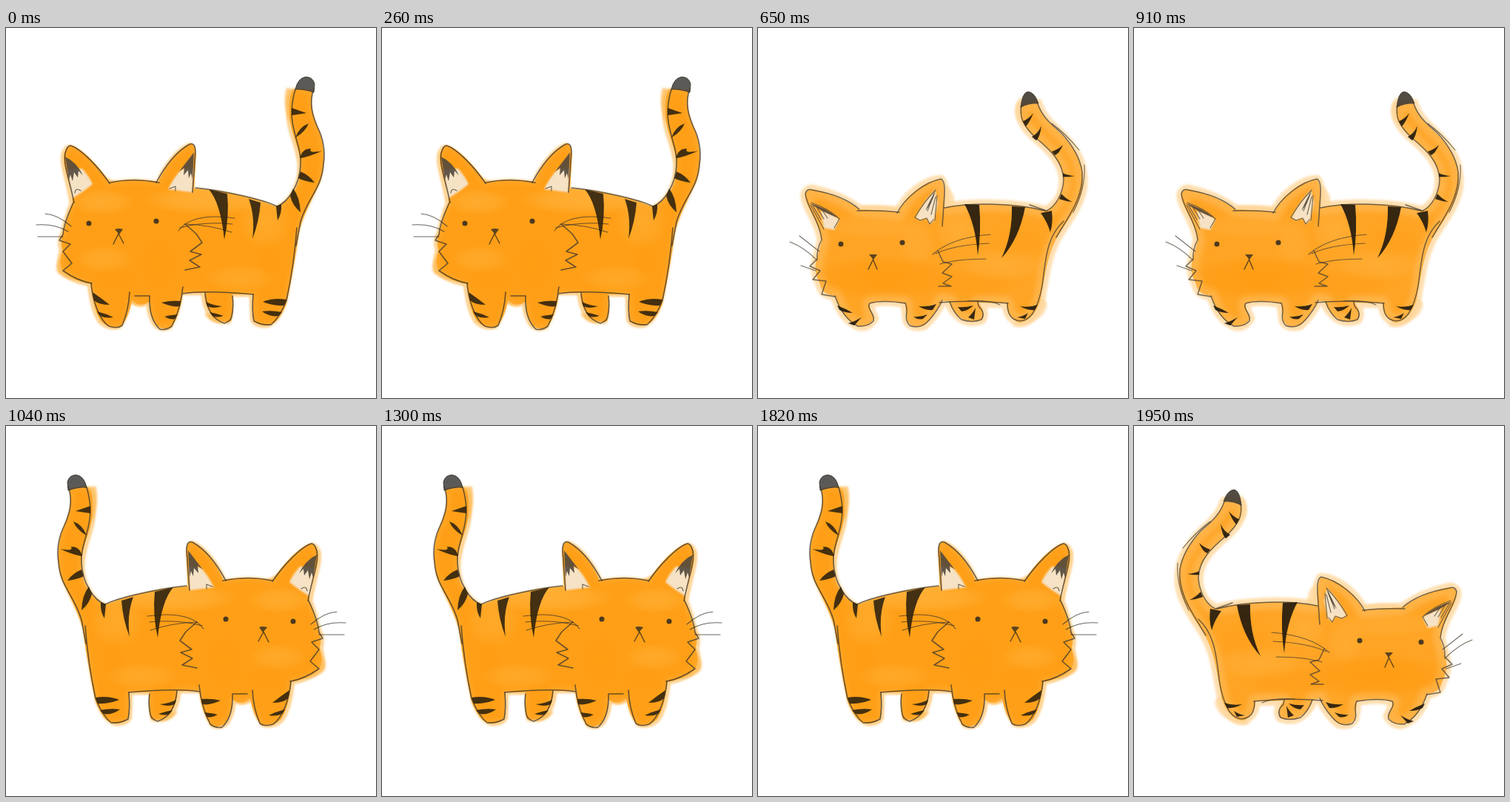
Recreate the animation shown at these times as an HTML page with a canvas. Size 500 px wide and 500 px high, loop 2080 ms.

```html
<!DOCTYPE html>
<html lang="en">
<head>
<meta charset="utf-8">
<title>Tiger cat</title>
<style>
html, body { margin: 0; width: 100%; height: 100%; overflow: hidden; background: #fff; }
canvas { display: block; width: 500px; height: 500px; }
</style>
</head>
<body>
<canvas id="stage" width="500" height="500"></canvas>
<script>
const ctx = document.getElementById('stage').getContext('2d');
const STEP = 130, STEPS = 16;

const standing = {
  paint: '#ff9f17', halo: '#ffb84f', haloWidth: 4, shift: [-2, 1],
  rim: '#ffab33', rimWidth: 8,
  ink: '#3a352c', lineWidth: 1.6, stripeInk: '#30230f',
  body: 'M90 236C86 205 75 185 79 168Q84 156 92 160C108 168 128 190 140 209Q172 202 206 208C214 190 230 164 250 156Q258 158 256 180L254 217C300 220 345 232 366 242C384 234 398 214 398 188C398 160 382 140 383 112C382 96 385 82 394 82L415 84C410 100 414 118 421 134C433 160 430 190 425 206C415 230 402 250 396 275C391 310 385 345 379 372Q368 400 354 402Q336 402 334 392L333 360L306 360Q308 385 304 396Q285 400 276 386Q268 372 268 358L239 358Q236 385 224 404Q212 410 202 400Q193 385 194 370Q182 378 170 368Q166 390 156 403Q140 408 128 396C118 380 116 360 114 346Q90 342 76 328Q71 315 76 300Q72 285 78 275Q84 250 90 236Z',
  spill: ['M381 80Q375 100 385 128L392 82Z', 'M78 306Q66 318 72 330Q84 340 98 340Z', 'M128 196L152 208L138 214Z',
    'M168 360Q170 376 186 374L194 366V358Z', 'M270 384Q276 398 296 398L285 388Z'],
  // x, y, rx, ry, lightness
  patches: [[275, 232, 70, 16, .16], [130, 235, 34, 14, .12], [350, 262, 28, 30, .1], [205, 318, 22, 30, -.12],
    [132, 312, 30, 14, .1], [318, 338, 40, 14, .09], [148, 340, 26, 14, -.1], [355, 320, 12, 36, -.1]],
  inner: ['M83 192L103 190Q112 200 117 211Q104 222 88 231Q87 212 83 192Z', 'M237 191L253 190L252 222Q234 220 219 218Q226 203 237 191Z'],
  tufts: ['M80 174Q95 181 104 199L98 193L97 202L92 195L90 207L87 198L85 205Z', 'M254 168Q244 181 234 194L241 189L240 199L246 192L247 203L250 196L252 204Z'],
  tip: 'M391 83Q394 68 405 66Q415 66 417 76L416 87Q402 82 391 83Z',
  tipInk: '#4a4846',
  lines: [
    'M92 236C86 205 77 185 80 169Q83 158 88 159C102 164 125 188 140 210',
    'M140 209Q172 202 207 209', 'M203 209C212 192 228 168 248 157Q256 154 256 168L252 222',
    'M256 216C290 219 350 232 366 241C381 236 397 212 398 185C400 162 385 140 386 112Q387 96 391 83',
    'M416 82C409 101 414 118 421 134Q433 158 429 184C427 217 407 230 398 262L392 294',
    'M393 270C390 310 384 345 379 368Q370 391 358 401Q345 402 335 396Q332 382 334 360',
    'M239 359Q268 354 334 360', 'M115 345C117 370 127 395 139 403Q150 407 157 402Q166 380 167 357',
    'M174 362H194C193 385 198 398 208 407Q216 409 224 403Q236 380 239 350',
    'M269 358C271 380 279 394 295 399Q303 397 305 390Q308 375 306 362',
    'M91 236Q78 264 77 279L72 287L87 292L77 302L89 318L77 328Q97 342 116 345',
    'M242 265L257 278L265 290L249 302L264 306L248 314L262 323L242 327'],
  thin: ['M233 274Q251 249 309 257', 'M235 270Q268 261 306 265', 'M242 265Q275 266 305 276',
    'M88 268Q70 252 53 251', 'M84 275Q65 264 41 266', 'M77 282H43',
    'M93 223Q94 215 101 220', 'M221 217L229 214L229 220'],
  stripes: [
    'M274 218Q290 236 295 286Q302 255 299 224Z', 'M328 231L344 236Q342 262 333 285Q337 255 328 231Z',
    'M365 241L372 238Q373 250 367 260Z', 'M388 217Q397 228 398 249Q387 240 384 227Z',
    'M398 194Q410 199 417 209Q403 207 395 203Z', 'M397 176Q400 163 412 163Q408 170 427 166Q410 174 397 176Z',
    'M391 148Q397 133 409 129Q405 140 391 148Z', 'M386 108L406 115L386 118Z',
    'M117 357Q130 366 140 374Q125 374 119 368Z', 'M123 383Q135 386 145 391Q133 393 126 388Z',
    'M236 369Q222 368 210 371Q225 378 235 376Z', 'M232 387Q222 388 214 390Q223 395 228 393Z',
    'M270 370Q280 375 292 376Q280 380 272 376Z', 'M275 384Q286 386 294 389Q284 392 279 389Z',
    'M379 367Q362 364 347 370Q361 376 376 375Z', 'M373 384Q358 381 346 383Q357 391 368 389Z'],
  eyes: [[112, 264], [203, 261]],
  nose: 'M147 272Q153 270 158 272L153 279Z',
  mouth: 'M152 278L145 292M152 278L159 291'
};

const crouching = {
  paint: '#ffa424', halo: '#ffd596', haloWidth: 13, shift: [0, 0],
  rim: '#ffba55', rimWidth: 20,
  ink: '#453c30', lineWidth: 1.5, stripeInk: '#21190e',
  body: 'M86 288C84 262 62 240 64 224Q68 216 78 219C100 224 122 234 137 245Q165 246 190 249C200 226 226 206 247 205Q253 210 252 243C290 235 350 237 390 247C406 238 413 222 413 205C412 180 392 163 375 148C356 132 352 118 356 104L378 102C384 122 398 132 412 146C432 168 440 185 439 212C436 240 416 262 403 285C390 310 388 335 381 370Q370 398 352 398Q336 390 336 372L298 371Q308 385 302 394Q285 400 272 390Q260 380 259 370L249 368Q238 390 224 402Q208 406 202 396Q200 385 199 372Q170 366 151 372Q150 380 157 392Q150 404 138 403Q115 396 104 362Q86 360 84 346Q74 328 80 310Z',
  spill: ['M357 92Q342 104 350 124L360 132Z', 'M378 365Q398 366 386 386Q370 404 344 403L352 392Z',
    'M252 212Q266 218 266 240L252 244Z', 'M132 244Q160 236 194 242L188 250Z'],
  patches: [[270, 272, 24, 24, .1], [330, 320, 48, 18, .09], [160, 268, 58, 14, .07], [170, 338, 80, 24, -.3],
    [350, 288, 32, 22, -.1], [215, 292, 20, 22, .08], [290, 345, 50, 16, -.14]],
  inner: ['M85 247Q102 252 110 259L103 273L89 270Z', 'M239 219L243 236L238 260L232 265L228 257L218 260L213 256Q224 234 239 219Z'],
  tufts: ['M70 237Q90 242 109 257Q88 249 70 237Z', 'M240 219Q232 234 226 247Q235 238 240 219Z'],
  tip: 'M355 107Q357 87 365 86Q374 87 379 102Q366 101 355 107Z',
  tipInk: '#40392f',
  lines: [
    'M86 287C84 262 65 240 64 224Q66 216 74 219C98 223 120 230 137 245', 'M134 247Q165 246 191 249',
    'M188 250C198 230 225 208 247 204Q253 206 252 225L249 268', 'M252 243C290 235 350 237 388 247',
    'M367 239L390 247C404 240 412 222 413 205C412 180 395 165 375 148C358 132 353 120 356 104',
    'M378 102C384 121 398 131 410 142Q434 168 438 194C441 228 418 257 403 283',
    'M413 261C391 281 389 311 386 333Q383 366 371 386Q359 401 345 393Q337 388 337 372',
    'M245 371Q290 367 338 372',
    'M104 362C110 380 120 395 135 403Q148 404 156 396C159 386 146 380 151 372Q168 367 199 372',
    'M199 372C205 384 195 391 205 402Q220 408 232 394Q244 380 249 368',
    'M259 370Q264 385 275 394Q290 399 302 394Q308 385 298 376L297 370',
    'M85 288Q79 301 80 312L70 322L84 328L74 340L92 342L86 360L104 363',
    'M243 301L250 316L262 319L249 331L262 336L250 345L261 349L244 349'],
  thin: ['M236 306Q262 283 314 279', 'M240 305Q265 293 312 291', 'M246 319Q270 312 308 312',
    'M83 302L56 281', 'M80 314Q62 296 43 289', 'M78 328L58 321',
    'M397 129Q416 143 434 165M441 185Q443 216 426 249', 'M283 369Q310 367 327 374',
    'M240 219Q224 235 212 256L219 260L228 257L232 265L237 259', 'M71 239L89 272M72 236Q96 244 110 258L103 270',
    'M74 240L85 259M80 243L89 258M86 245L94 257M238 224L229 247M240 228L234 252M242 226L239 260'],
  stripes: [
    'M279 238L299 239Q302 275 297 307Q294 265 279 238Z', 'M343 241L361 242Q353 285 329 311Q344 280 343 241Z',
    'M382 250L397 247Q399 263 395 276Q391 262 382 250Z', 'M410 224Q416 231 425 235Q415 234 407 231Z',
    'M412 196Q418 199 428 200Q418 202 412 201Z', 'M412 158Q407 170 401 172L397 167Q406 164 412 158Z',
    'M383 132Q381 148 376 152L370 147Q379 142 383 132Z', 'M372 115Q368 126 362 133L358 126Q367 122 372 115Z',
    'M107 375Q118 379 128 385Q117 385 110 381Z', 'M140 391Q132 396 122 399L130 402Z',
    'M241 373Q230 377 217 376Q226 382 236 381Z', 'M229 387Q220 391 210 390Q216 395 223 393Z',
    'M270 377Q280 378 291 375Q284 382 275 383Z', 'M294 378Q290 386 284 391L292 394Z',
    'M378 374Q367 378 354 376Q364 382 374 381Z', 'M365 385Q358 390 350 391L361 393Z'],
  eyes: [[112, 292], [195, 290]],
  nose: 'M150 306L161 306L156 313Z',
  mouth: 'M156 312L149 326M156 314L161 326'
};

function fill(paths, color) {
  ctx.fillStyle = color;
  for (const d of [].concat(paths)) ctx.fill(new Path2D(d));
}

function stroke(paths, color, width) {
  ctx.strokeStyle = color;
  ctx.lineWidth = width;
  for (const d of [].concat(paths)) ctx.stroke(new Path2D(d));
}

function softPatch([x, y, rx, ry, light]) {
  const tone = light > 0 ? '255,222,140' : '255,148,0';
  const glow = ctx.createRadialGradient(0, 0, 0, 0, 0, 1);
  glow.addColorStop(0, `rgba(${tone},${Math.abs(light) * 1.6})`);
  glow.addColorStop(.6, `rgba(${tone},${Math.abs(light)})`);
  glow.addColorStop(1, `rgba(${tone},0)`);
  ctx.save();
  ctx.translate(x, y);
  ctx.scale(rx * 1.3, ry * 1.3);
  ctx.fillStyle = glow;
  ctx.fillRect(-1, -1, 2, 2);
  ctx.restore();
}

function drawPaint(cat) {
  ctx.save();
  ctx.filter = 'blur(1.5px)';
  ctx.translate(...cat.shift);
  ctx.globalAlpha = .75;
  stroke(cat.body, cat.halo, cat.haloWidth);
  fill(cat.spill, cat.halo);
  ctx.restore();

  ctx.save();
  ctx.filter = 'blur(0.7px)';
  fill(cat.body, cat.paint);
  ctx.clip(new Path2D(cat.body));
  ctx.filter = 'blur(3px)';
  ctx.globalAlpha = .7;
  stroke(cat.body, cat.rim, cat.rimWidth);
  ctx.filter = 'none';
  ctx.globalAlpha = 1;
  cat.patches.forEach(softPatch);
  ctx.filter = 'blur(1px)';
  fill(cat.inner, '#f6e2c4');
  ctx.restore();
}

function drawInk(cat) {
  ctx.save();
  ctx.globalAlpha = .75;
  stroke(cat.lines, cat.ink, cat.lineWidth);
  stroke(cat.thin, cat.ink, 1.1);
  ctx.globalAlpha = .9;
  fill(cat.tufts, '#51483d');
  fill(cat.stripes, cat.stripeInk);
  fill(cat.tip, cat.tipInk);
  stroke(cat.tip, cat.ink, 1);
  fill(cat.nose, '#4a3820');
  stroke(cat.mouth, '#4c3a1e', 1.4);
  ctx.fillStyle = '#3a2f1e';
  for (const [x, y] of cat.eyes) {
    ctx.beginPath();
    ctx.arc(x, y, 3.5, 0, 2 * Math.PI);
    ctx.fill();
  }
  ctx.restore();
}

function draw(step) {
  const cat = step % 2 ? crouching : standing;
  const flipped = step >= STEPS / 2;
  ctx.setTransform(1, 0, 0, 1, 0, 0);
  ctx.fillStyle = '#fff';
  ctx.fillRect(0, 0, 500, 500);
  if (flipped) ctx.setTransform(-1, 0, 0, 1, 500, 0);
  ctx.lineCap = ctx.lineJoin = 'round';
  drawPaint(cat);
  drawInk(cat);
}

const start = performance.now();
let shown = -1;
function tick() {
  const step = Math.floor((performance.now() - start) / STEP) % STEPS;
  if (step !== shown) draw(shown = step);
  requestAnimationFrame(tick);
}
tick();
</script>
</body>
</html>
```
